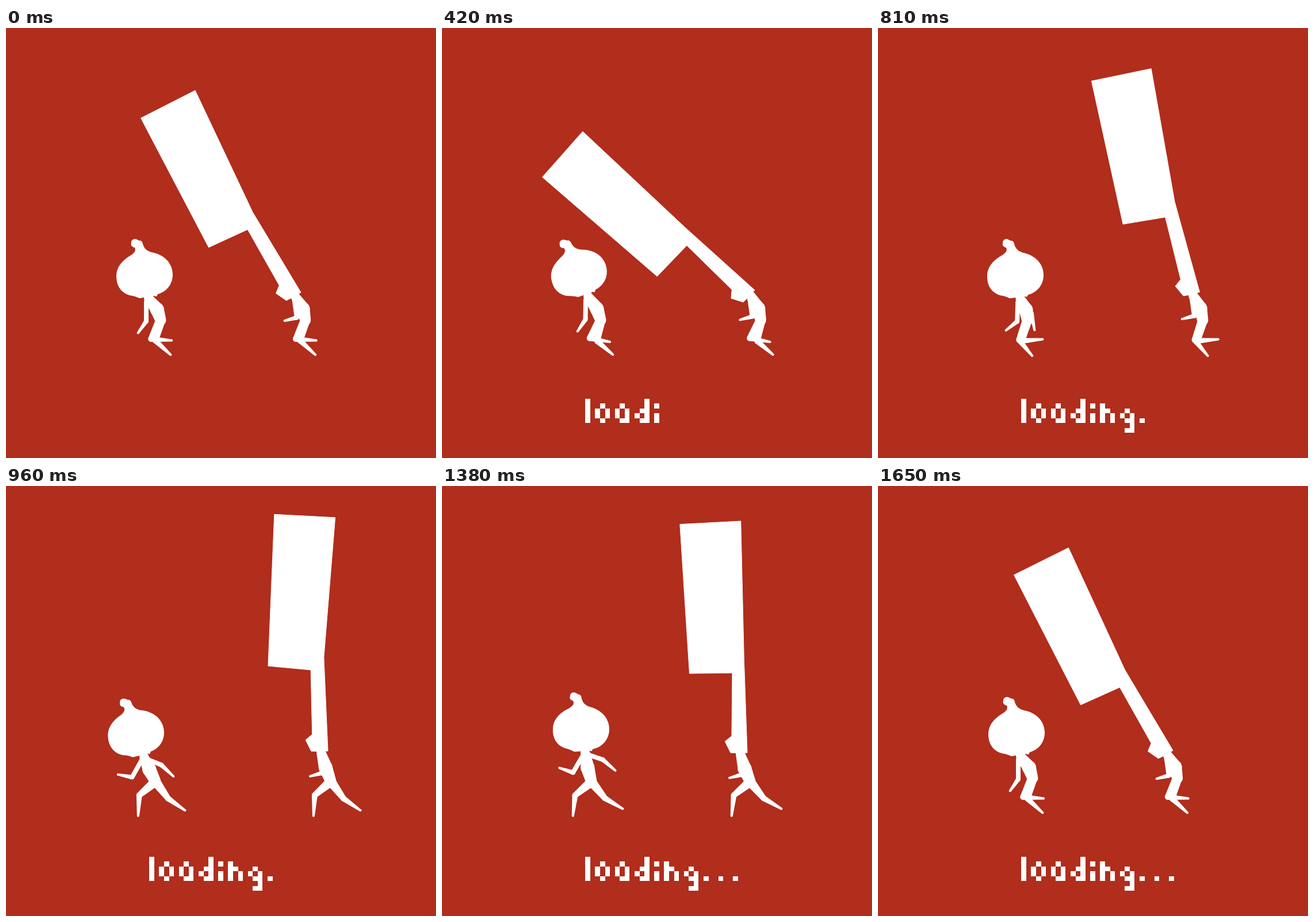
Animation, 748 px wide and 748 px high, one loop 1680 ms. Source, as an HTML page with a canvas:

```html
<!DOCTYPE html>
<html lang="en">
<head>
<meta charset="utf-8">
<title>loading...</title>
<style>
html, body { margin: 0; width: 100%; height: 100%; overflow: hidden; background: #b12d1c; }
canvas { display: block; width: 100vw; height: 100vh; object-fit: contain; }
</style>
</head>
<body>
<canvas width="748" height="748" role="img" aria-label="loading..."></canvas>
<script>
const LOOP = 1680, FRAME = 30;
const HOLD = 60, RUN = 1620, STEP = RUN / 4; // the bodies are drawn on twos
const ctx = document.querySelector('canvas').getContext('2d');
const rad = deg => deg * Math.PI / 180;
const mix = (a, b, u) => a.map((v, i) => v + (b[i] - v) * u);

// Smooth periodic curve through rows of [time, ...values].
function spline(keys, t, period) {
  const n = keys.length;
  const at = i => {
    const [time, ...values] = keys[(i + n) % n];
    return [time + period * Math.floor(i / n), values];
  };
  let i = n - 1;
  while (keys[i][0] > t) i--;
  const [[t0, a], [t1, b], [t2, c], [t3, d]] = [-1, 0, 1, 2].map(k => at(i + k));
  const h = t2 - t1, left = t1 - t0, right = t3 - t2, u = (t - t1) / h;
  return b.map((v, j) => {
    const slope = (c[j] - v) / h;
    const m1 = ((v - a[j]) / left * h + slope * left) / (h + left);
    const m2 = (slope * right + (d[j] - c[j]) / right * h) / (h + right);
    return v + (c[j] - v) * u * u * (3 - 2 * u) + h * u * (1 - u) * (m1 * (1 - u) - m2 * u);
  });
}

// time, grip x, grip y, handle degrees, blade degrees, blade length
const SWING = [
  [0, 513, 460, -31, -27, 234],
  [300, 535, 456, -48, -48.5, 244],
  [420, 544, 456, -48, -48.5, 244],
  [660, 555, 459, -29, -28, 231],
  [960, 560, 461, -2.5, 3, 244],
  [1200, 548, 472, 13, 14.5, 260],
  [1380, 531, 464, -2, -3, 240],
  [1650, 513, 460, -30.8, -26.5, 234]
];

// time, head x, head y, head tilt, neck x, hip x
const BOB = [
  [0, 241, 429, 0, 248, 269],
  [420, 238, 426, -11, 254, 276],
  [660, 246, 428, 3, 252, 262],
  [960, 226, 430, -5, 240, 260],
  [1200, 231, 423, -2, 240, 264],
  [1380, 242, 422, 4, 249, 260]
];

// steps, thigh degrees, shin degrees: swing forward, plant, push off, kick back
const LEG = [[0, -27, 86], [.39, -50, -5], [.63, -50, 2], [1, -14, 47], [1.39, 38, 57], [1.63, 45, 97]];

// steps, upper arm and forearm degrees: front arm, back arm
const ARMS = [[0, 0, -35, 24, 5], [.39, -30, -105, 70, 48], [.63, -25, -156, 81, 55]];

const HANDLE = 163;
const HEAD = [[-16, 0], [-29, -1], [-38, -21], [-26, -30]];

const turn = ([x, y], deg) => {
  const c = Math.cos(rad(deg)), s = Math.sin(rad(deg));
  return [x * c - y * s, x * s + y * c];
};
const place = (origin, point, deg) => turn(point, deg).map((v, i) => v + origin[i]);

function polygon(points) {
  ctx.beginPath();
  points.forEach(p => ctx.lineTo(...p));
  ctx.closePath();
  ctx.fill();
}

function limb(points, radii) {
  points.forEach(([x, y], i) => {
    const r = radii[i];
    ctx.beginPath();
    ctx.arc(x, y, r, 0, 7);
    ctx.fill();
    if (!i) return;
    const [px, py] = points[i - 1], pr = radii[i - 1];
    const d = Math.hypot(x - px, y - py) || 1, nx = (py - y) / d, ny = (x - px) / d;
    polygon([[px + nx * pr, py + ny * pr], [x + nx * r, y + ny * r],
      [x - nx * r, y - ny * r], [px - nx * pr, py - ny * pr]]);
  });
}

// Two bones hanging from a joint; 0 degrees points down, positive points back.
function jointed(start, lengths, degrees, radii) {
  const points = [start];
  lengths.forEach((length, i) => points.push(place(points[i], [0, length], -degrees[i])));
  limb(points, radii);
}

const hipHeight = steps => 511.5 - 3.5 * Math.cos(2 * Math.PI * steps);

function trunk(neck, hip, steps) {
  const middle = mix(neck, hip, .52);
  middle[0] += 1 + 3 * Math.cos(2 * Math.PI * steps);
  limb([neck, middle, hip], [8, 12, 9.5]);
  for (const lead of [0, 1])
    jointed(hip, [37, 36], spline(LEG, (steps + lead) % 2, 2), [8.5, 5, 2]);
}

const BULB = new Path2D('M-23-55C-24-60-18-64-13-61L-9-59C-6-60-3-56-3-53C-1-46 4-41 12-39' +
  'C34-35 49-20 49 0C49 17 38 30 23 34L21 38L16 37L12 40L5 39L-9 41L-14 39L-20 37' +
  'C-38 35-49 22-49 3C-49-14-38-24-28-31C-19-36-14-41-17-47C-21-48-25-51-23-55Z');

function onion(held) {
  const steps = held / STEP;
  const [x, y, tilt, neckX, hipX] = spline(BOB, held, LOOP);
  const neck = [neckX, y + 41], [front, foreFront, back, foreBack] = spline(ARMS, steps % 1, 1);
  trunk(neck, [hipX, hipHeight(steps)], steps);
  jointed([neckX - 4, y + 47], [34, 25], [front, foreFront], [4, 4, 2]);
  jointed([neckX + 7, y + 46], [25, 29], [back, foreBack], [4, 4, 2]);
  ctx.save();
  ctx.translate(x, y);
  ctx.rotate(rad(tilt));
  ctx.fill(BULB);
  ctx.restore();
}

function carrier(held) {
  const steps = held / STEP, [x, y, handle] = spline(SWING, held, LOOP);
  const neck = place([x, y], [-12, 2], handle);
  trunk(neck, [neck[0] + 17, hipHeight(steps)], steps);
  jointed([neck[0] - 2, neck[1] + 6], [30, 22], [8, -75], [4, 4, 2]);
}

function cleaver(t) {
  const [x, y, handle, blade, length] = spline(SWING, t, LOOP);
  const grip = [x, y], spine = place(grip, [0, -HANDLE], handle);
  const edge = [[-21.5, 23], [-96, 20], [-99, -length], [7, -length]];
  polygon([spine, grip, ...HEAD.map(p => place(grip, p, handle)), ...edge.map(p => place(spine, p, blade))]);
  ctx.stroke();
}

// column, pixel rows
const GLYPHS = [
  [0, '#/#/#/#/#'], [2, '/.#/#.#/#.#/.#'], [6, '/.#/#.#/#.#/.##'], [10, '..#/..#/.##/#.#/.##'],
  [14, '/#//#/#'], [16, '/#/##/#.#/#.#'], [20, '//.#/#.#/.##/..#/.##'],
  [24, '////#'], [27, '////#'], [30, '////#']
];
const LETTERS = 7;
const appears = i => i < LETTERS ? 90 + 75 * i : 630 + 360 * (i - LETTERS);

function caption(t) {
  const px = c => Math.round(249.3 + c * 8.57), py = r => Math.round(645 + r * 8.43);
  GLYPHS.forEach(([col, rows], i) => {
    if (t < appears(i)) return;
    rows.split('/').forEach((row, r) => [...row].forEach((dot, c) => {
      const x = px(col + c), y = py(r);
      if (dot === '#') ctx.fillRect(x, y, px(col + c + 1) - x, py(r + 1) - y);
    }));
  });
}

function draw(now) {
  const t = Math.floor(now % LOOP / FRAME) * FRAME;
  const held = Math.floor(t / HOLD) * HOLD % RUN;
  ctx.fillStyle = '#b12d1c';
  ctx.fillRect(0, 0, 748, 748);
  ctx.fillStyle = ctx.strokeStyle = '#fff';
  onion(held);
  carrier(held);
  cleaver(t);
  caption(t);
}

const begin = performance.now();
function tick() {
  draw(performance.now() - begin);
  requestAnimationFrame(tick);
}
tick();
</script>
</body>
</html>
```
